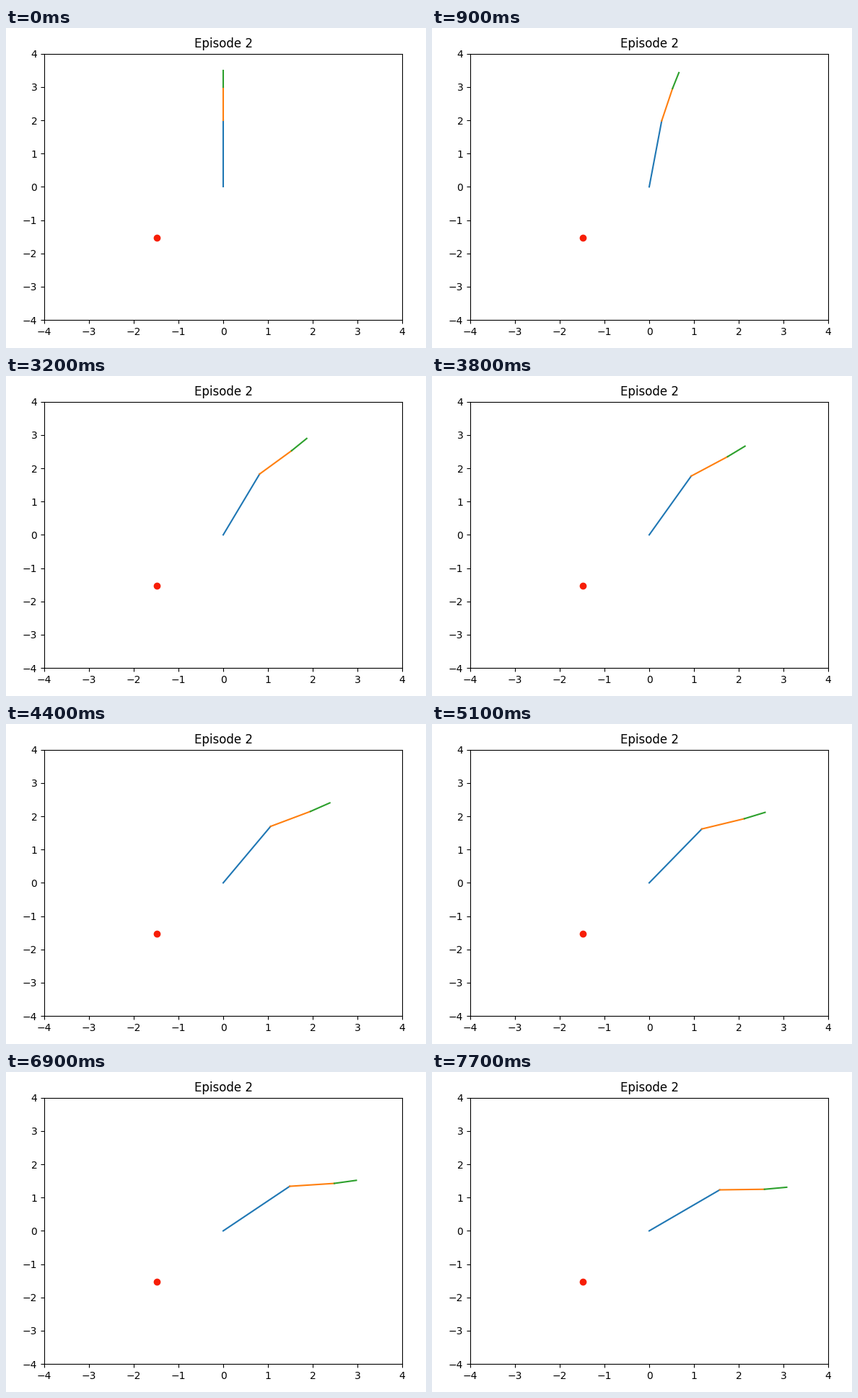
Write a matplotlib script that moves like this. It is 582 px wide and 444 px high and loops after 8000 ms.

```python
import numpy as np
import matplotlib.pyplot as plt
from matplotlib.animation import FuncAnimation

W, H, DPI = 582, 444, 100
FRAMES, INTERVAL = 80, 100
LINKS = np.array([2, 1, 0.5])

fig = plt.figure(figsize=(W / DPI, H / DPI), dpi=DPI, facecolor="white")
ax = fig.add_axes([53 / W, 38.81 / H, 496 / W, 369.57 / H])
ax.set_xlim(-4, 4)
ax.set_ylim(-4, 4)
ax.set_title("Episode 2", x=0.501)

arm = [ax.plot([], [], color=f"C{i}", lw=1.5)[0] for i in range(3)]
ax.plot(-1.48, -1.52, "o", color="#f71e06", ms=6)


def joint_angles(step):
    """Bend of each joint in degrees, relative to the link before it."""
    shoulder = 4 * step
    elbow = np.interp(step, [0, 4, 9, 10, 11, 13], [0, 12, 36, 33, 37, 37])
    wrist = np.interp(step, [0, 1, 6, 13], [0, 4, -3, -6])
    return shoulder, elbow, wrist


def arm_points(step):
    heading = np.radians(np.cumsum(joint_angles(step)))
    x = np.cumsum(LINKS * np.sin(heading))
    y = np.cumsum(LINKS * np.cos(heading))
    return np.append(0, x), np.append(0, y)


def update(n):
    # One control step every 600 ms, the first at 200 ms
    x, y = arm_points((n + 4) // 6)
    for i, link in enumerate(arm):
        link.set_data(x[i:i + 2], y[i:i + 2])
    return arm


anim = FuncAnimation(fig, update, frames=FRAMES, interval=INTERVAL,
                     repeat=True, repeat_delay=0)
plt.show()
```
